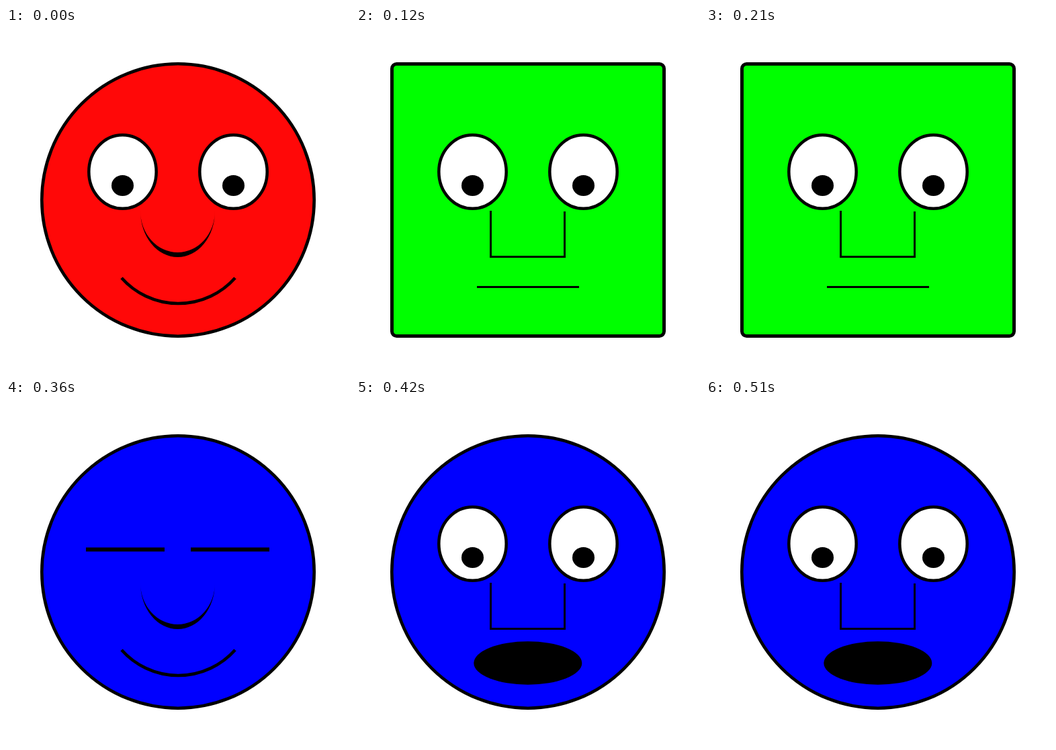
These frames come from a looping animation (512 by 512 pixels, 570 ms). An HTML page:

```html
<!DOCTYPE html>
<html lang="en">
<head>
<meta charset="utf-8">
<title>Changing faces</title>
<style>
  html, body { margin: 0; width: 100%; height: 100%; overflow: hidden; background: #fff; }
  svg { display: block; width: 100%; height: 100%; }
  .line { fill: none; stroke: #000; stroke-width: 3; }
</style>
</head>
<body>
<svg viewBox="0 0 512 512">
  <defs>
    <g id="eye">
      <ellipse cy="214" rx="50.2" ry="54.8" fill="#fff" stroke="#000" stroke-width="4.5"/>
      <ellipse cy="234.5" rx="16.5" ry="15.5"/>
    </g>
  </defs>
  <g id="head" stroke="#000">
    <circle data-part="round" cx="256" cy="256" r="202.7" stroke-width="4.6"/>
    <rect data-part="square" x="53.5" y="53.5" width="405" height="405" rx="7" stroke-width="5"/>
  </g>
  <g data-part="open">
    <use href="#eye" x="173.5"/>
    <use href="#eye" x="338.5"/>
  </g>
  <path data-part="closed" class="line" style="stroke-width:6" d="M119 222.5H236M275 222.5H392"/>
  <path data-part="curvedNose" d="M200 272.5A55.5 68.5 0 0 0 311 272.5A55.5 61.5 0 0 1 200 272.5Z"/>
  <path data-part="boxNose" class="line" d="M200.5 272V340.5H310.5V273"/>
  <path data-part="smile" class="line" style="stroke-width:4.5" d="M172 372A113 113 0 0 0 341 372"/>
  <path data-part="flat" class="line" d="M180 385.5H332"/>
  <ellipse data-part="gasp" cx="255.8" cy="391.5" rx="80.5" ry="32.3"/>
</svg>
<script>
const faces = [
  { until: 120, color: '#ff0808', parts: ['round', 'open', 'curvedNose', 'smile'] },
  { until: 270, color: '#00ff00', parts: ['square', 'open', 'boxNose', 'flat'] },
  { until: 420, color: '#0000ff', parts: ['round', 'closed', 'curvedNose', 'smile'] },
  { until: 570, color: '#0000ff', parts: ['round', 'open', 'boxNose', 'gasp'] }
];
const head = document.getElementById('head');
const parts = document.querySelectorAll('[data-part]');
const start = performance.now();

function draw(now) {
  const time = Math.max(0, now - start) % 570;
  const face = faces.find(f => time < f.until);
  head.setAttribute('fill', face.color);
  for (const part of parts) {
    part.style.display = face.parts.includes(part.dataset.part) ? '' : 'none';
  }
  requestAnimationFrame(draw);
}
draw(start);
</script>
</body>
</html>
```
